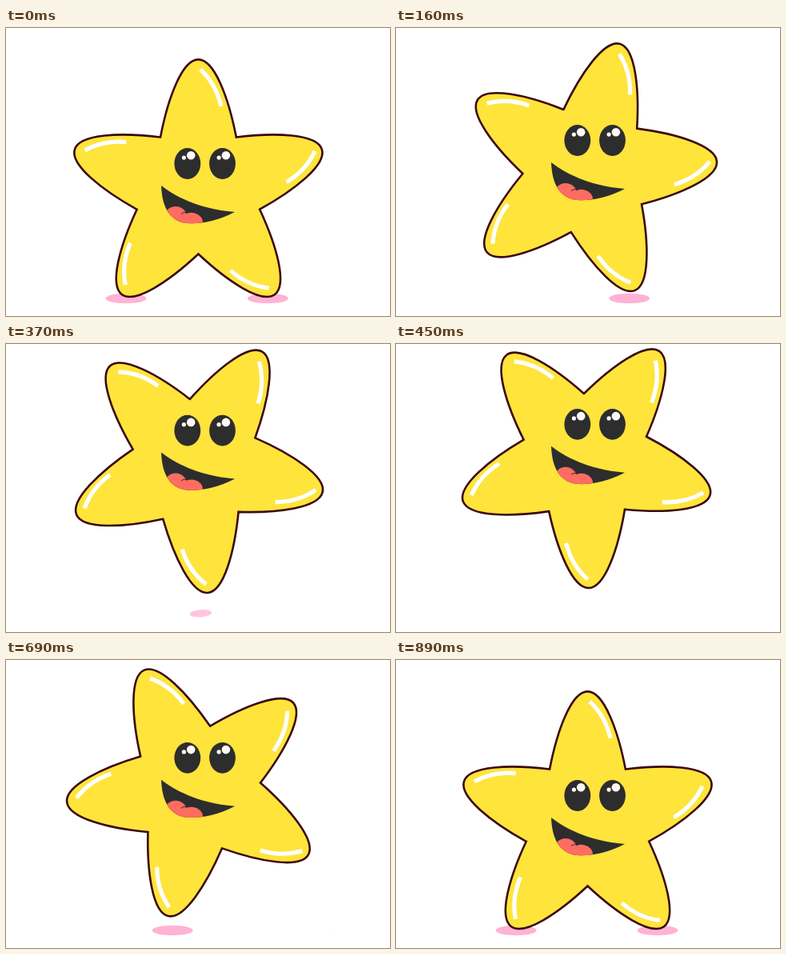
Write an HTML page that moves like this. It is 480 px wide and 360 px high and loops after 0.93 s.

```html
<!DOCTYPE html>
<html lang="en">
<head>
<meta charset="utf-8">
<title>Bouncing star</title>
<style>
  html, body { margin: 0; width: 100%; height: 100%; overflow: hidden; background: #fff; }
  svg { display: block; width: 100vw; height: 100vh; }
</style>
</head>
<body>
<svg viewBox="0 0 480 360">
  <defs>
    <clipPath id="lips"><use href="#mouth"/></clipPath>
    <g id="eye">
      <ellipse rx="16.4" ry="19.4" fill="#2d2d2d"/>
      <circle cx="4.4" cy="-10.2" r="5.3" fill="#fff8f4"/>
      <circle cx="-4.4" cy="-7.4" r="2.6" fill="#fff8f4"/>
    </g>
  </defs>
  <g id="shadows" fill="#ffb3d4"></g>
  <g id="star">
    <path id="body" fill="#ffe43b" stroke="#3a0a12" stroke-width="2.6"/>
    <g id="shine" fill="none" stroke="#fff" stroke-width="5.2"></g>
  </g>
  <g id="face">
    <use href="#eye" x="226.8" y="169.5"/>
    <use href="#eye" x="270.5" y="169.5"/>
    <path id="mouth" fill="#2d2d2d" d="M194 197C210 209 238 226 286 230C262 243 236 246 222 243.5C203 239 195 222 194 197Z"/>
    <g clip-path="url(#lips)" fill="#ff6c62">
      <ellipse cx="212" cy="236" rx="14" ry="13"/>
      <ellipse cx="233" cy="241" rx="13" ry="10" transform="rotate(12 233 241)"/>
      <path d="M219 232.5Q221 230.5 225 230.5" fill="none" stroke="#2d2d2d" stroke-width="1"/>
    </g>
  </g>
</svg>
<script>
const NS = 'http://www.w3.org/2000/svg';
const $ = id => document.getElementById(id);
const add = (parent, tag, attrs) => {
  const el = parent.appendChild(document.createElementNS(NS, tag));
  for (const k in attrs) el.setAttribute(k, attrs[k]);
  return el;
};

// One arm, pointing up from the centre, repeated five times.
const arm = [[-47.4, -65.3], [-38, -114], [-20.3, -162.4], [0, -162.4], [20.3, -162.4], [38, -114], [47.4, -65.3]];
const turn = ([x, y], deg) => {
  const a = deg * Math.PI / 180, c = Math.cos(a), s = Math.sin(a);
  return [x * c - y * s, x * s + y * c].map(v => v.toFixed(2)).join(' ');
};
let outline = '';
const nudge = [[0, 0], [-3.2, -3.5], [-1.5, -1.6], [1, 0], [0, 0]];
for (let i = 0; i < 5; i++) {
  const p = arm.map(q => turn(q, i * 72));
  outline += (i ? '' : 'M' + p[0]) + 'C' + p.slice(1).join(' ');
  add($('shine'), 'path', {
    d: 'M2.6 -150Q22.3 -131.8 28.5 -104',
    transform: `rotate(${i * 72}) translate(${nudge[i]})`
  });
}
$('body').setAttribute('d', outline + 'Z');

const [leaving, main, arriving] = [0, 1, 2].map(() => add($('shadows'), 'ellipse', { rx: 25.5, ry: 6.3 }));
const clamp = v => Math.max(0, Math.min(1, v));
const shade = (el, x, y, size, tilt = 0) => {
  const s = clamp(size);
  el.setAttribute('transform', `translate(${x} ${y}) rotate(${tilt}) scale(${s} ${Math.sqrt(s)})`);
  el.setAttribute('opacity', s ? 0.5 + 0.5 * s : 0);
};

const LOOP = 930, APEX = 13, LAST = 22;
const ease = (u, a) => a * u * u + (1 - a) * u ** 3;

// Turn progress: 0 at rest, 1 at the top of the jump, 2 back on the ground.
const progress = n => n <= APEX
  ? 1 - ease(1 - n / APEX, 1.8)
  : 1 + ease((n - APEX) / (LAST - APEX), 2.34);

function draw(ms) {
  const step = Math.floor((ms < 200 ? ms : ms - 10) / 40);
  const p = progress(Math.min(step, LAST));
  const h = 1 - Math.abs(p - 1);
  const drift = p <= 1 ? -3.6 * p : -0.9 - 2.7 * h;

  $('star').setAttribute('transform', `translate(${240.4 + drift} ${201.8 - 61.6 * h}) rotate(${36 * p})`);
  $('face').setAttribute('transform', `translate(0 ${-72 * h})`);

  const s = clamp((0.96 - h) * 5);
  shade(main, 327.3 - 88.6 * p - 18 * (1 - s), 338 - 2.5 * (1 - s), s, -10 * (1 - s));
  shade(leaving, 150 - 122 * p, 338, (0.4 - p) * 6);
  shade(arriving, 327 + 122 * (2 - p), 338, (0.66 - (2 - p)) * 2.9);
}

const start = performance.now();
function tick() {
  draw((performance.now() - start) % LOOP);
  requestAnimationFrame(tick);
}
tick();
</script>
</body>
</html>
```
